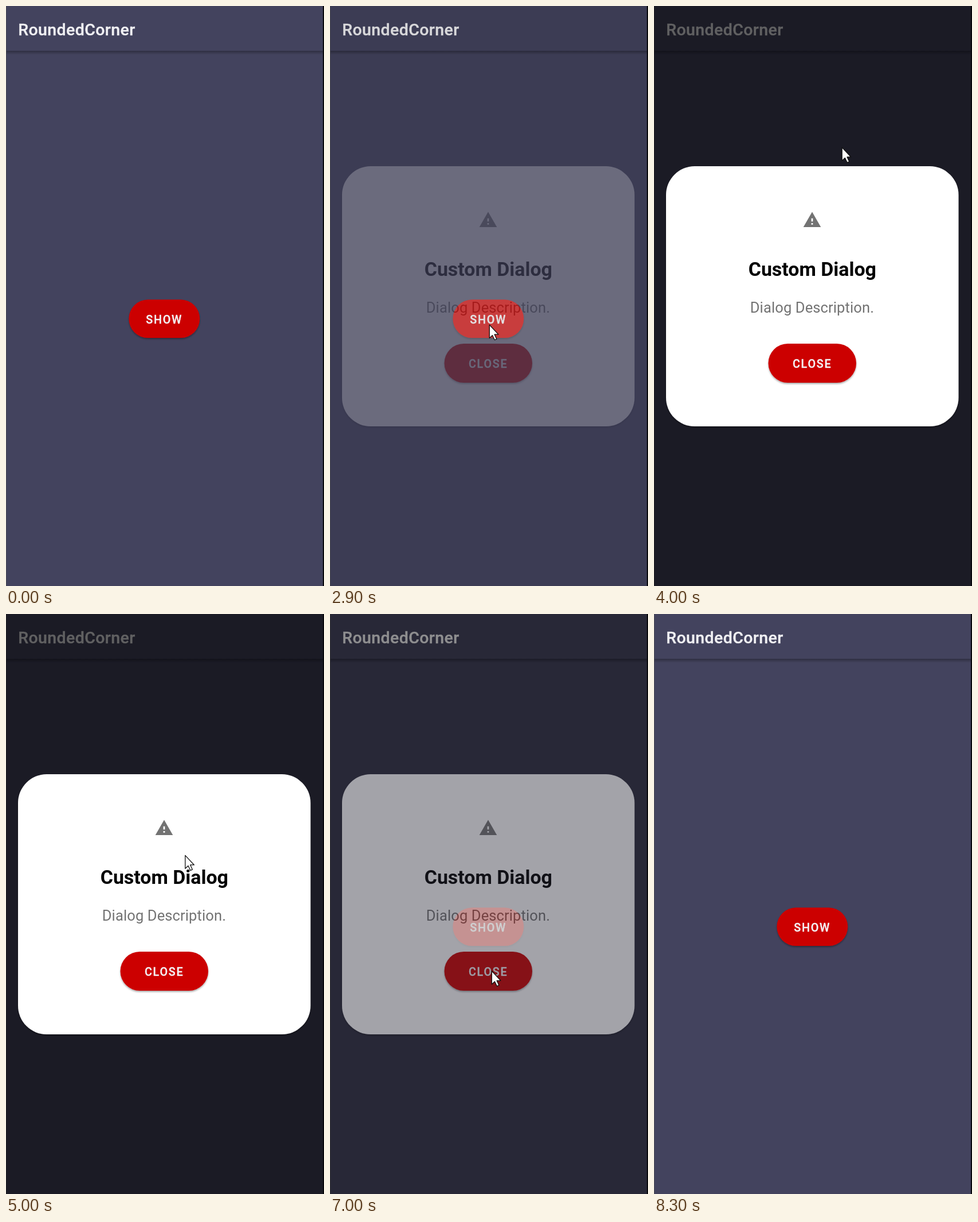
An HTML page that plays this animation: 555 px wide and 1010 px high, repeating every 8500 ms.

```html
<!DOCTYPE html>
<html lang="en">
<head>
<meta charset="utf-8">
<title>RoundedCorner</title>
<style>
  html, body { margin: 0; width: 100%; height: 100%; overflow: hidden; background: #43435e; }
  svg { display: block; width: 555px; height: 1010px; font-family: Roboto, sans-serif; }
  .btn { fill: #cc0000; }
  .label { fill: #f4f2f5; stroke: #f4f2f5; stroke-width: .4px; font-size: 19.7px; font-weight: 500; letter-spacing: 1.76px; }
  .bar { fill: #f0f0f3; stroke: #f0f0f3; stroke-width: .4px; font-size: 28.5px; font-weight: 500; letter-spacing: .4px; }
  .head { fill: #000; font-size: 33.9px; font-weight: 700; text-anchor: middle; }
  .desc { fill: #737373; font-size: 25.5px; letter-spacing: .12px; text-anchor: middle; }
</style>
</head>
<body>
<svg viewBox="0 0 555 1010">
  <defs>
    <linearGradient id="edge" x1="0" y1="0" x2="0" y2="1">
      <stop offset="0" stop-color="#000" stop-opacity=".3"/>
      <stop offset="1" stop-color="#000" stop-opacity="0"/>
    </linearGradient>
    <filter id="soft" x="-20%" y="-20%" width="140%" height="150%">
      <feDropShadow dx="0" dy="2" stdDeviation="1.6" flood-color="#000" flood-opacity=".35"/>
    </filter>
  </defs>

  <rect width="555" height="1010" fill="#43435e"/>
  <rect y="78" width="555" height="7" fill="url(#edge)"/>
  <rect width="1" height="1010" fill="#4c4c57"/>
  <text class="bar" x="21.2" y="50.6">RoundedCorner</text>
  <rect class="btn" x="214.4" y="511.3" width="123.8" height="66.7" rx="33.3" filter="url(#soft)"/>
  <text class="label" x="244.3" y="553">SHOW</text>

  <rect id="dim" width="555" height="1010" fill="#000" opacity="0"/>

  <g id="dialog" opacity="0">
    <rect x="21" y="279" width="510.5" height="453" rx="50" fill="#fff" filter="url(#soft)"/>
    <path transform="translate(259.3 355.8) scale(1.39)" fill="#737373"
      d="M1 21h22L12 2 1 21zm12-3h-2v-2h2v2zm0-4h-2v-4h2v4z"/>
    <text class="head" x="276.3" y="470">Custom Dialog</text>
    <text class="desc" x="275.9" y="534">Dialog Description.</text>
    <rect class="btn" x="199.5" y="588" width="153.5" height="68" rx="34" filter="url(#soft)"/>
    <text class="label" x="242" y="629.5">CLOSE</text>
  </g>

  <rect x="553" width="2" height="1010" fill="#08080c"/>
  <path id="cursor" d="M0 0V23L5.2 18.2 9 26.2 12.6 24.6 8.9 16.6H15.6Z"
    fill="#fff" stroke="#111" stroke-width="1.3" stroke-linejoin="round" visibility="hidden"/>
</svg>
<script>
  const LOOP = 8500, STEP = 100;
  const ENTER = 1700, OPEN = 2800, CLOSE = 6900, LEAVE = 7300;
  const [dim, dialog, cursor] = ['dim', 'dialog', 'cursor'].map(id => document.getElementById(id));

  // Each move eases to (x, y) along an arc that swells by (bowX, bowY)
  const moves = [
    { from: ENTER, to: 2500, x: 278.3, y: 555.3, bowX: 0, bowY: 68 },
    { from: 3700, to: 4270, x: 330, y: 157, bowX: 15, bowY: 0 },
    { from: 4600, to: 5800, x: 299, y: 631, bowX: 0, bowY: 0 },
    { from: 5900, to: 6800, x: 282.3, y: 621.8, bowX: -57, bowY: 129 }
  ];

  const ramp = (t, from, span) => Math.min(1, Math.max(0, (t - from) / span));
  const easeOut = u => 1 - (1 - u) ** 2;

  function pointer(t) {
    let x = 33.2, y = 569.2;
    for (const m of moves) {
      const s = easeOut(ramp(t, m.from, m.to - m.from));
      const arc = Math.sin(Math.PI * s);
      x += (m.x - x) * s + m.bowX * arc;
      y += (m.y - y) * s + m.bowY * arc;
    }
    return `translate(${x} ${y})`;
  }

  function draw(t) {
    dim.setAttribute('opacity', .6 * (ramp(t, OPEN, 600) - ramp(t, CLOSE, 320)));
    dialog.setAttribute('opacity', ramp(t, OPEN, 420) - ramp(t, CLOSE, 233));
    cursor.setAttribute('visibility', t >= ENTER && t < LEAVE ? 'visible' : 'hidden');
    cursor.setAttribute('transform', pointer(t));
  }

  const start = performance.now();
  function tick() {
    const t = (performance.now() - start) % LOOP;
    draw(Math.floor(t / STEP) * STEP);
    requestAnimationFrame(tick);
  }
  tick();
</script>
</body>
</html>
```
